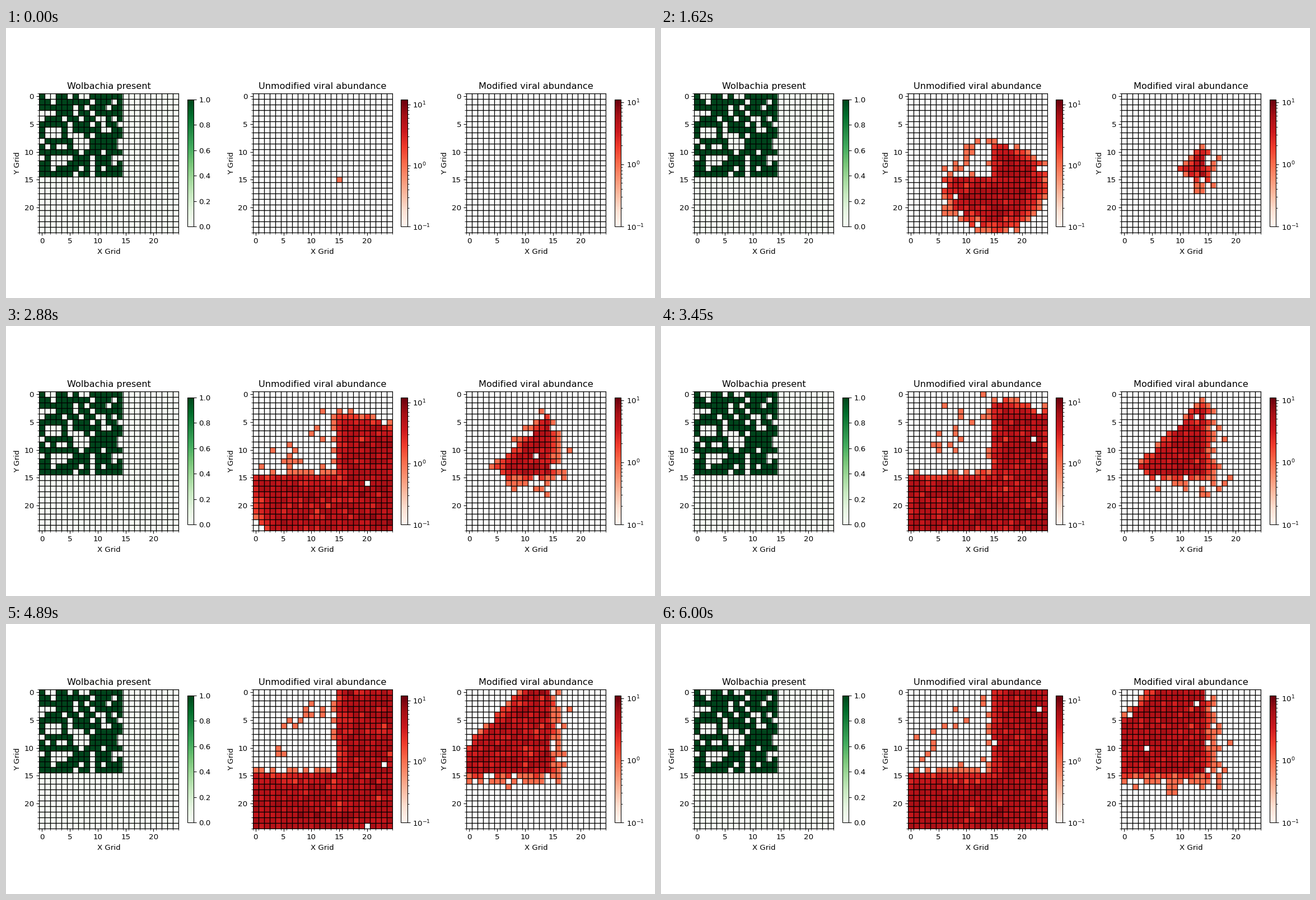
Write a matplotlib script that moves like this. It is 1159 by 483 pixels and loops after 6030 ms.

```python
import numpy as np
import matplotlib.pyplot as plt
from matplotlib.animation import FuncAnimation
from matplotlib.colors import LogNorm, Normalize

W, H, DPI = 1159, 483, 96.6
N, ZONE_SIZE = 25, 15
FRAMES, STEP = 201, 30
DRIFT = 10  # steps between two independent noise values of a cell

rng = np.random.default_rng(7)
rows, cols = np.mgrid[:N, :N]
edges = np.arange(N + 1) - .5

# Cells counted outward (1, 2, ...) and inward from the rim of the zone
outward = np.maximum(rows, cols) - ZONE_SIZE + 1
inward = 1 - outward
zone = outward <= 0
bacteria = (zone & (rng.random((N, N)) < .66)).astype(float)


def wild_score(step):
    """Fast outside the zone; inside only a thin wave and a leaky rim."""
    dx, dy = cols - 15, rows - 15
    front = .2 + .172 * step - np.hypot(dx, np.where(dy < 0, 1.4, 1) * dy)
    crest = 14 * (1 - np.exp(-step / 80))
    wave = 1.5 * np.exp(-((np.hypot(dx, dy) - crest) / 2.5) ** 2)
    wave -= 1.5 + .6 * step / FRAMES
    rim = .8 - .8 * inward
    return np.where(zone, np.minimum(front, np.maximum(wave, rim)), front)


def modified_score(step):
    """Fills the zone from its lower right corner, thinning out beyond it."""
    front = .13 * (step - 20) - np.abs(cols - 14) - np.abs(rows - 13)
    return np.where(zone, front, np.minimum(front, 1.2 - .55 * outward))


class Colony:
    def __init__(self, score, top):
        self.score, self.top = score, top
        self.phase = rng.uniform(0, DRIFT, (N, N))
        self.knots = rng.normal(size=(2, FRAMES // DRIFT + 3, N, N))

    def noise(self, step):
        k, f = np.divmod((step + self.phase) / DRIFT, 1)
        k = k.astype(int)
        a, b = (self.knots[:, k + i, rows, cols] for i in (0, 1))
        return (a + f * (b - a)) * min(1, step / 20)

    def at(self, step):
        jitter, spread = self.noise(step)
        score = self.score(step)
        alive = np.minimum(score, 2) + .85 * jitter > 0
        level = np.clip(1 + 1.2 * score, 1, self.top)
        count = np.clip(np.rint(level * (1 + .25 * spread)), 1, 8)
        return np.ma.masked_where(~alive, count)


def panel(ax, title, data, cmap, norm):
    img = ax.imshow(data, cmap=cmap, norm=norm)
    ax.vlines(edges, -.5, N - .5, color="k", lw=1)
    ax.hlines(edges, -.5, N - .5, color="k", lw=1)
    tick = dict(ls="", ms=2, mew=.6, color="k", clip_on=False)
    ax.plot(edges, np.full(N + 1, N - .5), marker=3, **tick)
    ax.plot(np.full(N + 1, -.5), edges, marker=0, **tick)
    ax.set(title=title, xlabel="X Grid", ylabel="Y Grid",
           xticks=range(0, N, 5), yticks=range(0, N, 5),
           xlim=(-.5, N - .5), ylim=(N - .5, -.5))
    fig.colorbar(img, ax=ax, shrink=.5)
    return img


wild = Colony(wild_score, np.where(zone, 2, np.minimum(2.2 + outward, 5)))
modified = Colony(modified_score, np.where(zone, 4.4, 1.6))

fig, axes = plt.subplots(1, 3, figsize=(W / DPI, H / DPI), dpi=DPI)
panel(axes[0], "Wolbachia present", bacteria, "Greens", Normalize(0, 1))
wild_img = panel(axes[1], "Unmodified viral abundance", wild.at(1), "Reds",
                 LogNorm(.1, 12))
modified_img = panel(axes[2], "Modified viral abundance", modified.at(1),
                     "Reds", LogNorm(.1, 11))
fig.tight_layout()


def update(frame):
    step = max(frame, 1)
    wild_img.set_data(wild.at(step))
    modified_img.set_data(modified.at(step))
    return wild_img, modified_img


anim = FuncAnimation(fig, update, frames=FRAMES, interval=STEP, repeat=True,
                     repeat_delay=0)
plt.show()
```
